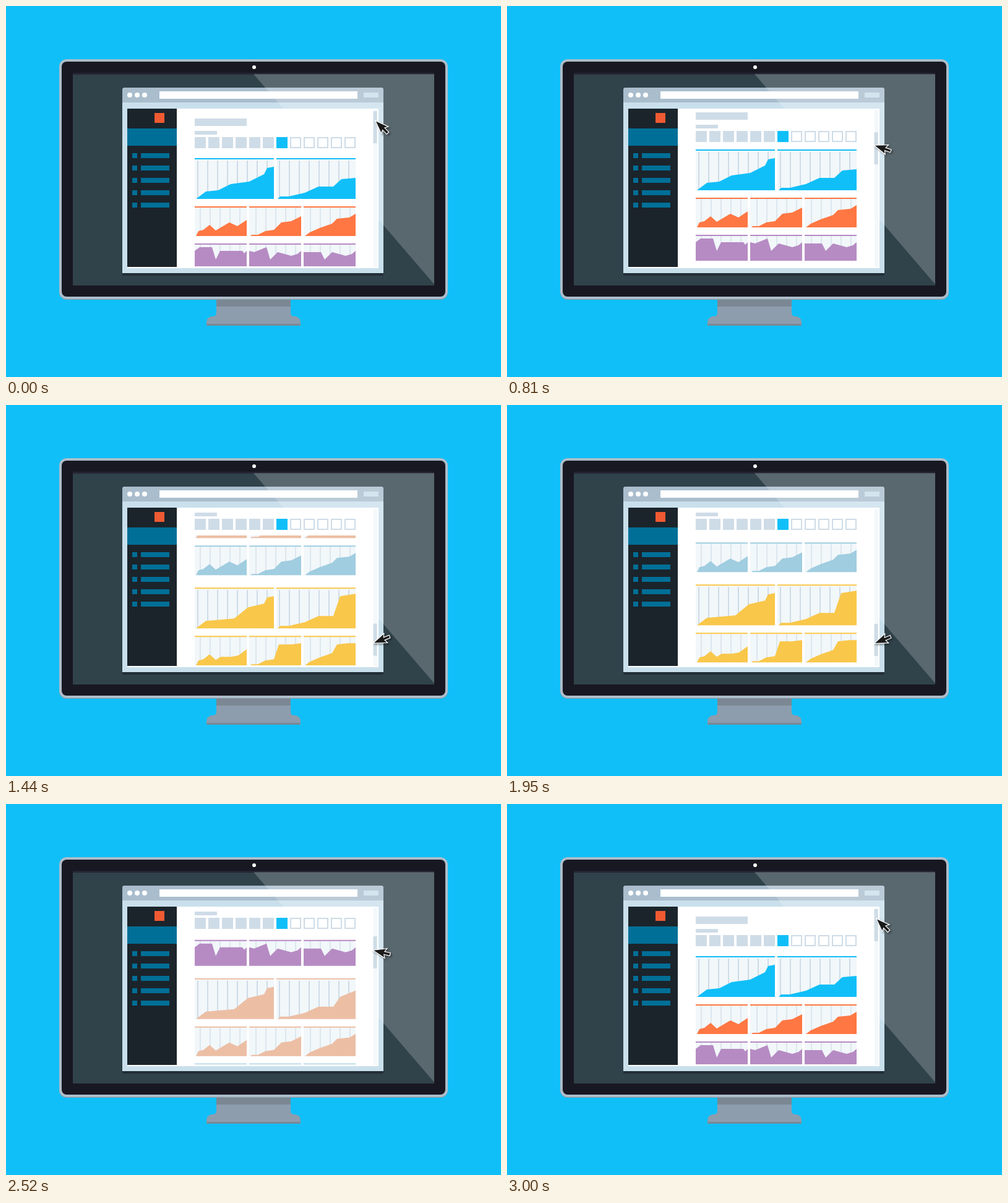
Recreate the animation shown at these times as an HTML page with a canvas. Size 800x600 px, loop 3300 ms.

```html
<!DOCTYPE html>
<html lang="en">
<head>
<meta charset="utf-8">
<title>Dashboard scrolling on a monitor</title>
<style>
  html, body { margin: 0; width: 100%; height: 100%; overflow: hidden; background: #11bff8; }
  canvas { display: block; }
</style>
</head>
<body>
<canvas id="stage" width="800" height="600"></canvas>
<script>
const ctx = document.getElementById('stage').getContext('2d');
const LOOP = 3300, STEP = 30, SCROLL_END = 362, THUMB_END = 184;
const BLUE = '#11bff8', PALE = '#cedce7', PAPER = '#f2f7fa';

function rect(color, x, y, w, h, radius = 0) {
  ctx.fillStyle = color;
  ctx.beginPath();
  ctx.roundRect(x, y, w, h, radius);
  ctx.fill();
}

function dot(x, y, r) {
  ctx.fillStyle = '#fff';
  ctx.beginPath();
  ctx.arc(x, y, r, 0, 7);
  ctx.fill();
}

function shape(color, path) {
  ctx.fillStyle = color;
  ctx.fill(new Path2D(path));
}

function clipped(x, y, w, h, draw) {
  ctx.save();
  ctx.beginPath();
  ctx.rect(x, y, w, h);
  ctx.clip();
  draw();
  ctx.restore();
}

// Cubic-bezier ease with flat ends, from 0 at `start` to 1 at `end`.
function ease(time, start, end, x1, x2) {
  const x = (time - start) / (end - start);
  if (x <= 0) return 0;
  if (x >= 1) return 1;
  let lo = 0, hi = 1, u;
  for (let i = 0; i < 24; i++) {
    u = (lo + hi) / 2;
    const v = 1 - u;
    if (3 * v * v * u * x1 + 3 * v * u * u * x2 + u ** 3 < x) lo = u; else hi = u;
  }
  return u * u * (3 - 2 * u);
}

// Area outlines, relative to the top left corner of each chart.
const climb = '2,66 18,54 64,50 86,32 112,26 117,16 128,14';
const ramp = '2,66 6,62 20,62 46,56 68,46 92,46 ';
const peaks = '2,48 6,40 14,38 24,30 34,39 ';
const stairs = '2,48 4,46 14,46 26,40 40,38 ';
const slope = '2,48 10,42 26,35 46,28 54,';
const valley = '34,26 46,14 68,20 78,17 84,12';

const steady = [peaks + '44,33 56,26 69,32 84,22', stairs + '52,26 68,24 84,16', slope + '20 74,18 84,12'];
const rows = [
  { y: 246, h: 66, color: BLUE, areas: ['2,66 18,54 38,52 58,42 88,38 112,26 117,16 128,14', ramp + '105,34 128,32'] },
  { y: 324, h: 48, color: '#ff7743', areas: steady },
  { y: 384, h: 42, color: '#b68bc3', areas: ['0,12 8,6 28,6 34,26 41,12 77,12 80,16 84,12', '0,12 8,14 28,6 ' + valley, '0,14 28,14 ' + valley] },
  { y: 446, h: 66, color: '#ecbfa5', areas: [climb, ramp + '103,30 128,20'] },
  { y: 524, h: 48, color: '#ecbfa5', areas: steady },
  { y: 584, h: 48, color: '#a0cde0', areas: steady },
  { y: 652, h: 66, color: '#f9c74a', areas: [climb, ramp + '103,14 128,10'] },
  { y: 730, h: 48, color: '#f9c74a', areas: [peaks + '42,34 58,34 70,32 84,22', stairs + '48,14 68,14 84,12', slope + '14 72,12 84,12'] },
];

function drawRow({ y, h, color, areas }) {
  const wide = areas.length === 2, width = wide ? 128 : 84;
  areas.forEach((area, i) => {
    ctx.save();
    ctx.translate(305 + i * (width + 4), y);
    rect(PAPER, 0, 2, width, h - 2);
    const first = wide ? 4 : i ? 10 : 8;
    for (let x = first; x < width; x += 16) rect(wide ? PALE : '#dce7ee', x, wide ? 4 : 2, 2, h - (wide ? 4 : 2));
    shape(color, `M${area.split(' ')[0].split(',')[0]},${h} L${area} V${h}Z`);
    rect(color, 0, 0, width, 2);
    ctx.restore();
  });
}

function drawMonitor() {
  rect(BLUE, 0, 0, 800, 600);
  shape('#8e9dae', 'M340 474H460V496Q460 502 466 502H468Q476 504 476 512V517H324V512Q324 504 332 502H334Q340 502 340 496Z');
  rect('#7b8793', 340, 474, 120, 12);
  rect('#7b8793', 324, 514, 152, 3, [0, 0, 2, 2]);
  rect('#8796a4', 86, 88, 628, 387, 12);
  rect('#adbdca', 86, 86, 628, 388, 12);
  rect('#181822', 90, 90, 620, 380, 8);
  dot(401, 99, 3);
  rect('#30424a', 108, 108, 584, 344);
  rect('#262535', 108, 108, 584, 3);
}

function drawWindow() {
  rect('#222e37', 188, 428, 422, 8, [0, 0, 2, 2]);
  rect('#c9e0ec', 188, 132, 422, 300, [4, 4, 0, 0]);
  rect('#a9bdcd', 188, 132, 422, 24, [4, 4, 0, 0]);
  shape('rgba(255,255,255,.2)', 'M400 110H692V450Z');
  for (const x of [200, 212, 224]) dot(x, 144, 4);
  rect('#fff', 248, 138, 320, 12);
  rect('#d3e5ef', 578, 140, 24, 8);
  rect('#fff', 196, 166, 406, 258);
  rect('#1b242b', 196, 166, 80, 256);
  rect('#f05a32', 240, 173, 16, 16);
  rect('#006f97', 196, 198, 80, 28);
  for (let y = 238; y < 320; y += 20) {
    rect('#006f97', 204, y, 8, 8);
    rect('#006f97', 218, y, 46, 8);
  }
}

function drawHeader(shift) {
  rect(PALE, 305, 182 - shift, 84, 12);
  rect(PALE, 305, 202 - shift, 36, 6);
  for (let i = 0; i < 12; i++) {
    const x = 305 + 22 * i, y = 212 - shift;
    rect(i === 6 ? BLUE : PALE, x, y, 18, 18);
    if (i > 6) rect('#fff', x + 2, y + 2, 14, 14);
  }
}

function drawCursor(y, degrees) {
  ctx.save();
  ctx.translate(607.5, y);
  ctx.rotate(degrees * Math.PI / 180);
  const arrow = new Path2D('M-13.5 0L5.5 -7L3 -1.8H13V1.8H3L5.5 7Z');
  ctx.lineWidth = 2.4;
  ctx.strokeStyle = '#fff';
  ctx.shadowColor = 'rgba(0,0,0,.45)';
  ctx.shadowBlur = 3;
  ctx.shadowOffsetX = ctx.shadowOffsetY = 2;
  ctx.stroke(arrow);
  ctx.shadowColor = 'transparent';
  ctx.fillStyle = '#1a1a1a';
  ctx.fill(arrow);
  ctx.restore();
}

function render(time) {
  const scroll = SCROLL_END * (ease(time, 660, 1620, .56, .015) - ease(time, 1920, 3000, .658, .442));
  const thumb = THUMB_END * (ease(time, 420, 1500, .636, .39) - ease(time, 1920, 3000, .674, .223));
  const tilt = 45 * Math.max(0, 1 - thumb / 97) ** 2 - 22 * Math.max(0, (thumb - 152) / 32);

  drawMonitor();
  drawWindow();
  clipped(300, 211, 270, 210, () => {
    ctx.translate(0, -scroll);
    rows.forEach(drawRow);
  });
  clipped(300, 167, 270, 254, () => drawHeader(Math.min(28, scroll * 10 / 14)));
  rect('#f3f8fb', 594, 168, 6, 254);
  rect(PALE, 593.5, 170 + thumb, 6, 52);
  drawCursor(196 + thumb, tilt);
}

function tick() {
  const time = performance.now() % LOOP;
  render(Math.floor(time / STEP) * STEP);
  requestAnimationFrame(tick);
}
tick();
</script>
</body>
</html>
```
